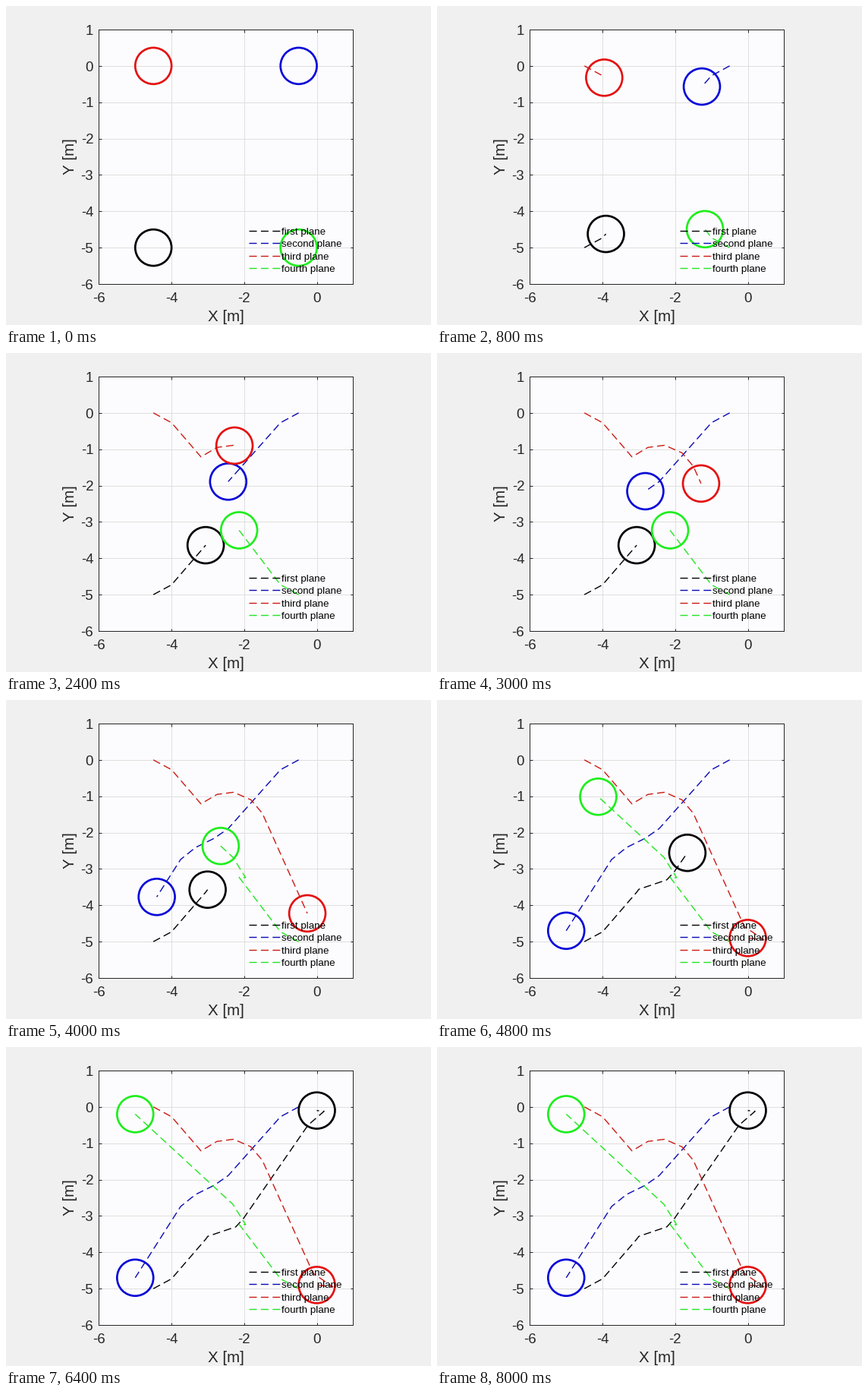
A matplotlib script that plays this animation: 560x420 px, repeating every 8200 ms.

```python
import numpy as np
import matplotlib.pyplot as plt
from matplotlib.animation import FuncAnimation

W, H = 560, 420
FRAMES, STEP_MS = 41, 200
LEFT, TOP, SIDE = 122.4, 31, 335      # plot box in pixels
UNIT = SIDE / 7                       # pixels per metre
MEET = 8                              # step at which the planes reach the middle
INK = "#262626"


class Plane:
    """Flies from a corner to its holding point, waits, then cruises on."""

    def __init__(self, name, ring, trail, start, route, go, speed):
        self.name, self.ring, self.trail = name, ring, trail
        self.go, self.speed = go, speed
        start = np.array(start)
        inward = np.sign([-2.5, -2.5] - start)
        self.pts = np.vstack([start, start + inward * [0.5, 0.27], route])
        legs = np.hypot(*np.diff(self.pts, axis=0).T)
        self.dist = np.append(0, np.cumsum(legs))

    def path(self, step):
        hold = self.dist[2]
        flown = (hold * min(step / MEET, 1) ** 1.5
                 + self.speed * max(step - self.go, 0))
        flown = min(flown, self.dist[-1])
        here = [np.interp(flown, self.dist, axis) for axis in self.pts.T]
        return np.vstack([self.pts[self.dist < flown], here])


# Each route begins with the holding point
PLANES = [
    Plane("first plane", "#000000", "#000000", (-4.5, -5),
          [(-3.06, -3.64), (-3, -3.56), (-2.23, -3.3), (-2.02, -3.07),
           (-0.24, -0.5), (0.2, -0.12), (0, -0.1)], 19.8, 0.44),
    Plane("second plane", "#0808d8", "#0a0ab4", (-0.5, 0),
          [(-2.44, -1.89), (-2.83, -2.16), (-3.34, -2.41), (-3.75, -2.74),
           (-5, -4.7)], 14, 0.465),
    Plane("third plane", "#e41010", "#cc1c14", (-4.5, 0),
          [(-3.19, -1.21), (-2.75, -0.95), (-2.29, -0.89), (-1.81, -1.1),
           (-1.5, -1.47), (-0.1, -4.58), (0.44, -4.95), (0, -4.9)], 10, 0.5),
    Plane("fourth plane", "#1eee1e", "#24e624", (-0.5, -5),
          [(-2.14, -3.23), (-1.96, -3.24), (-2.31, -2.68), (-5, -0.2)],
          17.4, 0.5),
]


def pt(px):
    return px * 0.72


def dashed(ax, x, y, color, **kw):
    width = 1.4
    return ax.plot(x, y, color=color, lw=pt(width), dash_capstyle="butt",
                   dashes=(10 / width, 5.4 / width), **kw)[0]


plt.rcParams["font.family"] = "Liberation Sans"
plt.rcParams["text.kerning_factor"] = 6
fig = plt.figure(figsize=(W / 100, H / 100), dpi=100, facecolor="#f0f0f0")

ax = fig.add_axes([LEFT / W, 1 - (TOP + SIDE) / H, SIDE / W, SIDE / H],
                  facecolor="#fcfcfe")
ax.set(xlim=(-6, 1), ylim=(-6, 1), xticks=range(-6, 1, 2), yticks=range(-6, 2))
ax.tick_params(direction="in", top=True, right=True, length=pt(3.5),
               width=pt(1), color=INK, labelbottom=False, labelleft=False)
ax.set_axisbelow(True)
ax.grid(color="#dfdfdf", lw=pt(1))
for spine in ax.spines.values():
    spine.set(color=INK, linewidth=pt(1))

# Overlay in pixel coordinates for text and legend
sheet = fig.add_axes([0, 0, 1, 1])
sheet.set(xlim=(0, W), ylim=(H, 0))
sheet.axis("off")


def label(x, y, text, px, color=INK, ha="center", **kw):
    sheet.text(x, y, text, size=pt(px), color=color, ha=ha, va="baseline", **kw)


for v in range(-6, 1, 2):
    label(LEFT + (v + 6) * UNIT, 390, str(v), 18.67)
for v in range(-6, 2):
    label(115.2, TOP + (1 - v) * UNIT + 6.7, str(v), 18.67, ha="right")
label(289.5, 415, "X [m]", 20.5)
label(90, 198.5, "Y [m]", 20.5, rotation=90, rotation_mode="anchor")

trails, rings = [], []
for i, plane in enumerate(PLANES):
    y = 296 + 16.4 * i
    dashed(sheet, [320, 361], [y, y], plane.trail)
    label(363, y + 4.8, plane.name, 13.33, "black", ha="left")
    trails.append(dashed(ax, [], [], plane.trail, zorder=3))
    rings.append(ax.add_patch(plt.Circle((0, 0), 0.5, fill=False, lw=pt(2.7),
                                         ec=plane.ring, zorder=4)))


def update(step):
    for plane, trail, ring in zip(PLANES, trails, rings):
        path = plane.path(step)
        trail.set_data(*path.T)
        ring.center = path[-1]
    return trails + rings


anim = FuncAnimation(fig, update, frames=FRAMES, interval=STEP_MS,
                     repeat=True, repeat_delay=0, blit=False)
plt.show()
```
